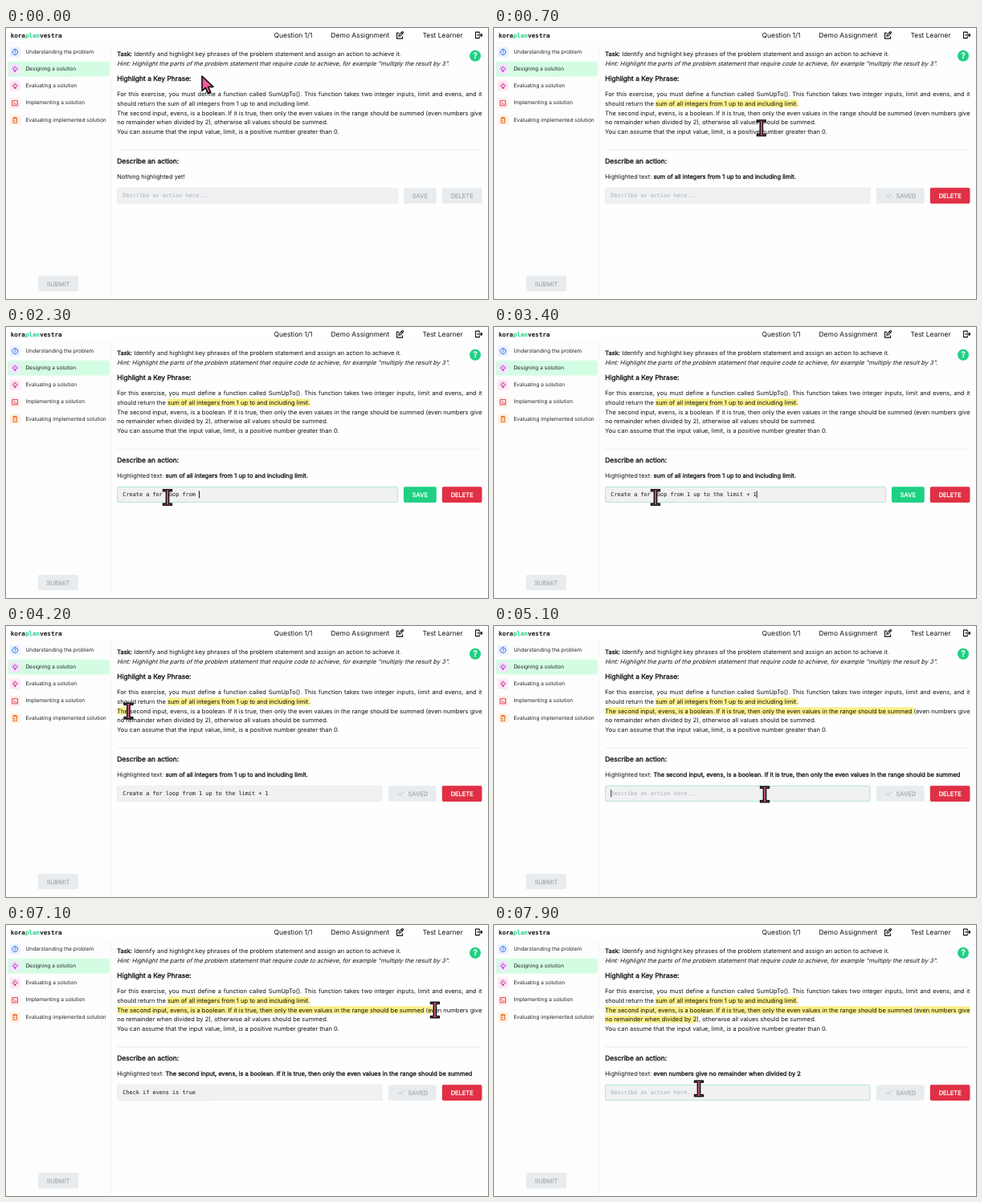
An HTML page for the animation above (8 s loop, 600 by 338 pixels).

```html
<!DOCTYPE html>
<html lang="en">
<head>
<meta charset="utf-8">
<title>Highlight and describe</title>
<style>
  html, body { margin: 0; width: 100%; height: 100%; overflow: hidden; background: #fff; }
  /* The page is laid out 1280 px wide and shown at 600 px. */
  #page {
    position: absolute; left: 0; top: 0; width: 1280px; height: 721px;
    transform: scale(.46875); transform-origin: 0 0; overflow: hidden;
    font: 16px/24.8px Inter, sans-serif; color: #111; background: #fefefe;
    text-rendering: geometricPrecision;
  }
  #page > * { position: absolute; left: calc(var(--x) * 1px); top: calc(var(--y) * 1px); margin: 0; }
  .t { white-space: pre; transform: translateY(-50%); }
  .big { font-size: 18px; }
  .small { font-size: 14px; color: #212529; }
  .b { font-weight: 400; -webkit-text-stroke: .04em currentColor; }
  .hint { transform: translateY(-50%) skewX(-14deg); transform-origin: 0 73%; }
  .logo { font: bold 16.2px/24px "DejaVu Sans Mono", monospace; }
  .logo span { color: #1fd083; }
  .bar { width: 1280px; height: 38px; background: #fff; border-bottom: 1px solid #f1f3f5; }
  .side { width: 279px; height: 682px; background: #fdfdfd; border-right: 1px solid #eceef0; }
  .active { width: 271px; height: 40px; border-radius: 4px; background: #d3fde3; }
  .tile { width: 28px; height: 28px; border-radius: 4px; }
  .rule { width: 969px; height: 1px; background: #d5d9dd; }
  .story { width: 969px; text-align: justify; }
  mark { background: #fbf08a; color: inherit; }
  .field {
    box-sizing: border-box; height: 42px; padding-left: 14px; border: 1px solid #dde1e5;
    border-radius: 4px; background: #f0f1f2; white-space: pre;
    font: 14.6px/42px "DejaVu Sans Mono", monospace;
  }
  .field.on { border-color: #5fd9a4; }
  .field.empty #typed { color: #a9b0b7; }
  #caret { display: inline-block; width: 2px; height: 19px; margin-right: -2px; vertical-align: -4px; background: #111; }
  .btn {
    height: 42px; border-radius: 4px; line-height: 42px; text-align: center;
    background: #e9ecef; color: #a9b1b9; -webkit-text-stroke: .04em currentColor;
  }
  .btn svg { vertical-align: -4px; margin-right: 10px; }
  .go { background: #1fd083; color: #fff; }
  .stop { background: #e03045; color: #fff; }
  .help { width: 30px; height: 30px; border-radius: 50%; background: #1fd083; color: #fff; font-size: 22px; line-height: 30px; text-align: center; }
  svg.icon { fill: none; stroke: currentColor; stroke-width: 2.3; stroke-linecap: round; stroke-linejoin: round; }
  #pointer { position: absolute; left: 0; top: 0; overflow: visible; }
</style>
</head>
<body>
<div id="page">
  <div class="bar" style="--x:0;--y:0"></div>
  <div class="side" style="--x:0;--y:39"></div>
  <div class="active" style="--x:4;--y:89"></div>
  <div class="t logo" style="--x:12;--y:19.5">kora<span>plan</span>vestra</div>
  <div class="t big" style="--x:711.5;--y:19.5">Question 1/1</div>
  <div class="t big" style="--x:863;--y:19.5">Demo Assignment</div>
  <div class="t big" style="--x:1106;--y:19.5">Test Learner</div>

  <div class="t" style="--x:295;--y:68"><span class="b">Task:</span> Identify and highlight key phrases of the problem statement and assign an action to achieve it.</div>
  <div class="t hint" style="--x:295;--y:93.5">Hint: Highlight the parts of the problem statement that require code to achieve, for example "multiply the result by 3".</div>
  <div class="help b" style="--x:1231;--y:59">?</div>
  <div class="t big b" style="--x:295;--y:135.5">Highlight a Key Phrase:</div>
  <p class="story" style="--x:295;--y:164.4">For this exercise, you must define a function called SumUpTo(). This function takes two integer inputs, limit and evens, and it should return the <span class="phrase">sum of all integers from 1 up to and including limit.</span><br><span class="phrase">The second input, evens, is a boolean. If it is true, then only the even values in the range should be summed </span>(<span class="phrase">even numbers give no remainder when divided by 2</span>), otherwise all values should be summed.<br>You can assume that the input value, limit, is a positive number greater than 0.</p>
  <div class="rule" style="--x:295;--y:324"></div>
  <div class="t big b" style="--x:295;--y:354.5">Describe an action:</div>
  <div class="t" style="--x:295;--y:395.5"><span id="label"></span><span id="picked" class="b"></span></div>
  <div class="field" id="field" style="--x:295;--y:424.5"><span id="caret"></span><span id="typed"></span></div>
  <div class="btn" id="save" style="--y:424.5"></div>
  <div class="btn" id="del" style="--x:1158;--y:424.5;width:106px">DELETE</div>
  <div class="btn" style="--x:85;--y:659;width:107px">SUBMIT</div>
</div>
<svg id="pointer" width="1" height="1">
  <path id="arrow" d="M0 0V18.5L4.4 14.6 7.6 21.5 10.8 20 7.6 13.4H14Z" fill="#ec5c9c" stroke="#000" stroke-width="1.5" stroke-linejoin="round"/>
  <path id="beam" d="M-5.4-9.8H5.4V-7.7H1.6V7.7H5.4V9.8H-5.4V7.7H-1.6V-7.7H-5.4Z" fill="#d6608f" stroke="#111" stroke-width="1.5"/>
</svg>
<script>
const $ = id => document.getElementById(id);
const page = $('page');
const LOOP = 8000, TICK = 100;

const shapes = {
  ask: 'M12 3a9 9 0 1 0 .01 0M12 17v.01M12 13.5a1.5 1.5 0 0 1 1-1.5 2.6 2.6 0 1 0-3-4',
  bulb: 'M3 12h1M12 3v1M20 12h1M5.6 5.6l.7.7M18.4 5.6l-.7.7M9 16a5 5 0 1 1 6 0 3.5 3.5 0 0 0-1 3 2 2 0 0 1-4 0 3.5 3.5 0 0 0-1-3M9.7 17h4.6',
  term: 'M4 4h16v16H4zM8 9l3 3-3 3M13 15h3',
  clip: 'M9 5H6v16h12V5h-3M9 3h6v4H9zM9 14l2 2 4-4',
  edit: 'M9 6H4v15h15v-5M9 15h3l8.5-8.5a1.5 1.5 0 0 0-3-3L9 12zM16 5l3 3',
  exit: 'M14 8V4H4v16h10v-4M9 12h13M18 8l4 4-4 4',
  tick: 'M5 12l5 5L20 7'
};
const icon = (name, size) =>
  `<svg class="icon" width="${size}" height="${size}" viewBox="0 0 24 24"><path d="${shapes[name]}"/></svg>`;

function add(cls, x, y, html, css = '') {
  page.insertAdjacentHTML('beforeend',
    `<div class="${cls}" style="--x:${x};--y:${y};${css}">${html}</div>`);
}

[
  ['Understanding the problem', 'ask', '#2f62d9', '#e9f1ff'],
  ['Designing a solution', 'bulb', '#a32fc4', '#f3e6fb'],
  ['Evaluating a solution', 'bulb', '#c81f86', '#fce8f4'],
  ['Implementing a solution', 'term', '#dc2f3c', '#ffeeee'],
  ['Evaluating implemented solution', 'clip', '#e8590c', '#fff2e4']
].forEach(([name, shape, ink, tint], i) => {
  const y = 64 + 45.2 * i;
  add('tile', 10, y - 14, '', `background:${tint}`);
  add('t', 14, y, icon(shape, 20), `color:${ink};line-height:0`);
  add('t small', 52, y, name);
});
add('t', 1034, 19, icon('edit', 24), 'line-height:0');
add('t', 1243, 19, icon('exit', 24), 'line-height:0');

// Each round: drag over a phrase, focus the field, type an action, save it.
const rounds = [
  { drag: [300, 600], focus: 900, type: 1080, save: 3700, text: 'Create a for loop from 1 up to the limit + 1' },
  { drag: [4100, 4700], focus: 5000, type: 5140, save: 6700, text: 'Check if evens is true' },
  { drag: [7000, 7500], focus: 7800, type: LOOP, save: LOOP, text: '' }
];
const RATE = 19 / 1000;

document.querySelectorAll('.phrase').forEach((el, i) => {
  const r = rounds[i];
  r.phrase = el.textContent;
  el.innerHTML = '<mark></mark><span></span>';
  [r.mark, r.rest] = el.children;
});

// Pointer stops: time, x, y
const path = [
  [0, 244, 60], [200, 201, 94], [300, 201, 94], [600, 379, 94], [900, 201, 212.5],
  [3400, 201, 212.5], [3600, 514, 214], [3800, 514, 214], [4100, 139, 106],
  [4700, 521, 106], [5000, 337, 210], [6300, 337, 210], [6600, 514, 213],
  [6700, 514, 213], [7000, 525, 106], [7500, 253, 117], [7800, 255, 204], [LOOP, 255, 204]
];
const clamp = v => Math.max(0, Math.min(1, v));
const smooth = p => p * p * (3 - 2 * p);

function pointerAt(t) {
  const i = path.findIndex(s => s[0] > t);
  const a = path[i - 1], b = path[i];
  const p = smooth((t - a[0]) / (b[0] - a[0]));
  return [a[1] + (b[1] - a[1]) * p, a[2] + (b[2] - a[2]) * p];
}

function draw(t) {
  let [x, y] = pointerAt(t);
  let now = null;
  for (const r of rounds) {
    const [from, to] = r.drag;
    const n = Math.floor(r.phrase.length * clamp((t - from) / (to - from)) ** 1.85);
    r.mark.textContent = r.phrase.slice(0, n);
    r.rest.textContent = r.phrase.slice(n);
    if (n && t < to) {
      const box = [...r.mark.getClientRects()].pop();
      x = box.right + .5;
      y = (box.top + box.bottom) / 2;
    }
    if (t >= to) now = r;
  }

  const typed = now ? now.text.slice(0, Math.max(0, Math.floor((t - now.type) * RATE))) : '';
  const focused = !!now && t >= now.focus && t < now.save;
  const saved = !!now && (!typed || t >= now.save);
  const typing = focused && typed && typed.length < now.text.length;

  $('label').textContent = now ? 'Highlighted text: ' : 'Nothing highlighted yet!';
  $('picked').textContent = now ? now.phrase : '';

  $('typed').textContent = typed || 'Describe an action here...';
  $('field').className = 'field' + (focused ? ' on' : '') + (typed ? '' : ' empty');
  $('field').style.width = (saved ? 704 : 746) + 'px';
  $('caret').style.display = focused && (typing || t % 1000 < 600) ? '' : 'none';
  if (typed) $('typed').after($('caret')); else $('typed').before($('caret'));

  const save = $('save');
  save.innerHTML = saved ? icon('tick', 20) + 'SAVED' : 'SAVE';
  save.className = 'btn' + (now && !saved ? ' go' : '');
  save.style.setProperty('--x', saved ? 1015 : 1056);
  save.style.width = (saved ? 128 : 87) + 'px';
  $('del').className = 'btn' + (now ? ' stop' : '');

  const overText = (y > 78 && y < 134) || (y > 198 && y < 219 && x < (saved ? 468 : 488));
  $('beam').style.display = overText ? '' : 'none';
  $('arrow').style.display = overText ? 'none' : '';
  $('pointer').style.transform = `translate(${x}px, ${y}px)`;
}

const start = performance.now();
let last = -1;
function loop() {
  const t = Math.floor((performance.now() - start) % LOOP / TICK) * TICK;
  if (t !== last) draw(last = t);
  requestAnimationFrame(loop);
}
loop();
</script>
</body>
</html>
```
